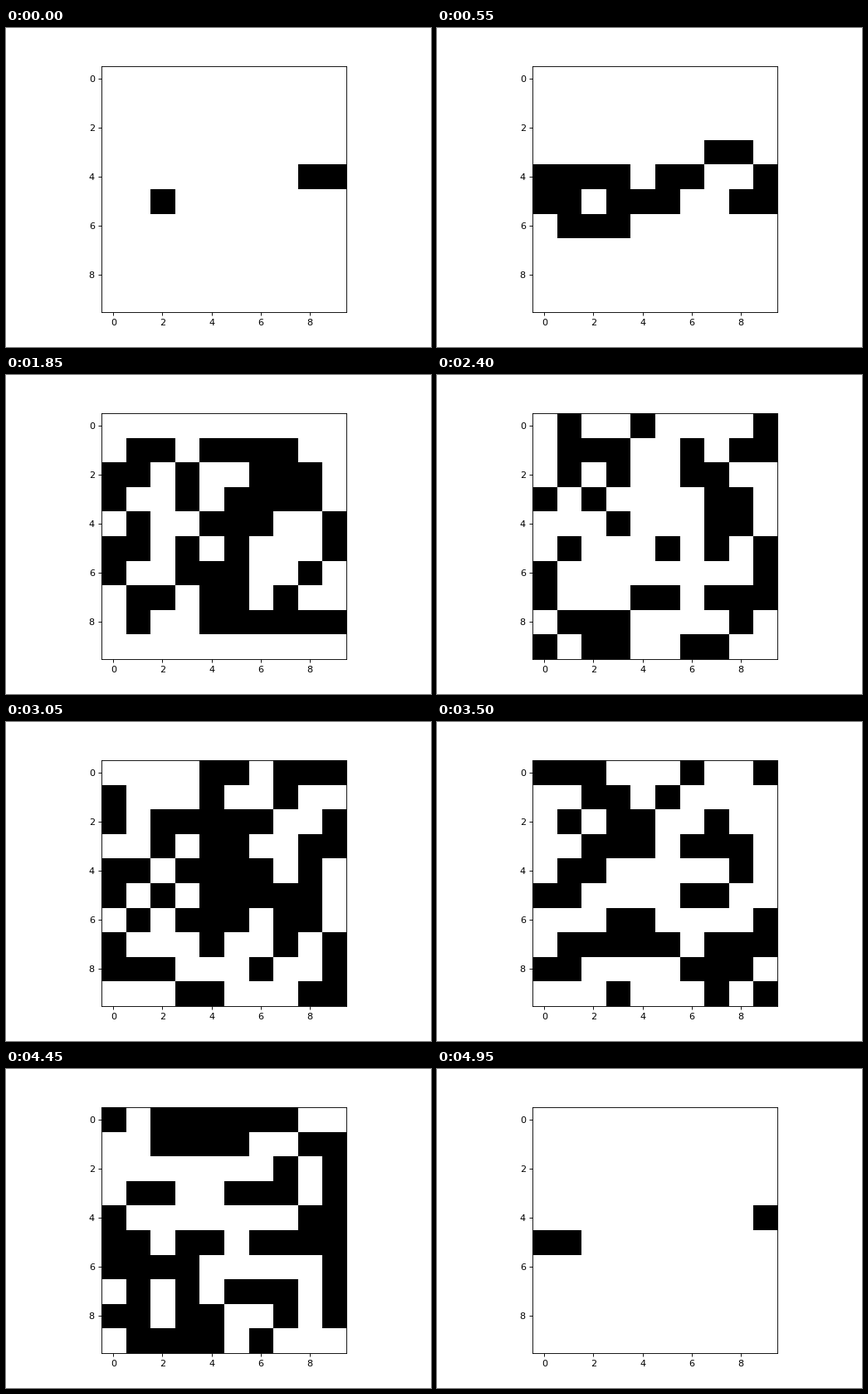
A matplotlib script that plays this animation: 512 by 384 pixels, repeating every 5 s.

```python
import numpy as np
import matplotlib.pyplot as plt
from matplotlib.animation import FuncAnimation

SIDE = 10
CELLS = SIDE * SIDE
STEPS = 100
INTERVAL = 50
FIRST = 2  # generation shown at the start of the loop


def rule30(cells):
    """One step of rule 30 on a ring of cells."""
    return np.roll(cells, 1) ^ (cells | np.roll(cells, -1))


def evolve(steps):
    cells = np.zeros(CELLS, dtype=int)
    cells[CELLS // 2] = 1
    history = [cells]
    for _ in range(steps - 1):
        history.append(rule30(history[-1]))
    return history


history = evolve(STEPS)


def grid(frame):
    return history[(frame + FIRST) % STEPS].reshape(SIDE, SIDE)


fig, ax = plt.subplots(figsize=(6.4, 4.8), dpi=80)
image = ax.imshow(grid(0), cmap="binary", vmin=0, vmax=1)


def update(frame):
    image.set_data(grid(frame))
    return (image,)


anim = FuncAnimation(fig, update, frames=STEPS, interval=INTERVAL,
                     repeat=True, repeat_delay=0)
plt.show()
```
